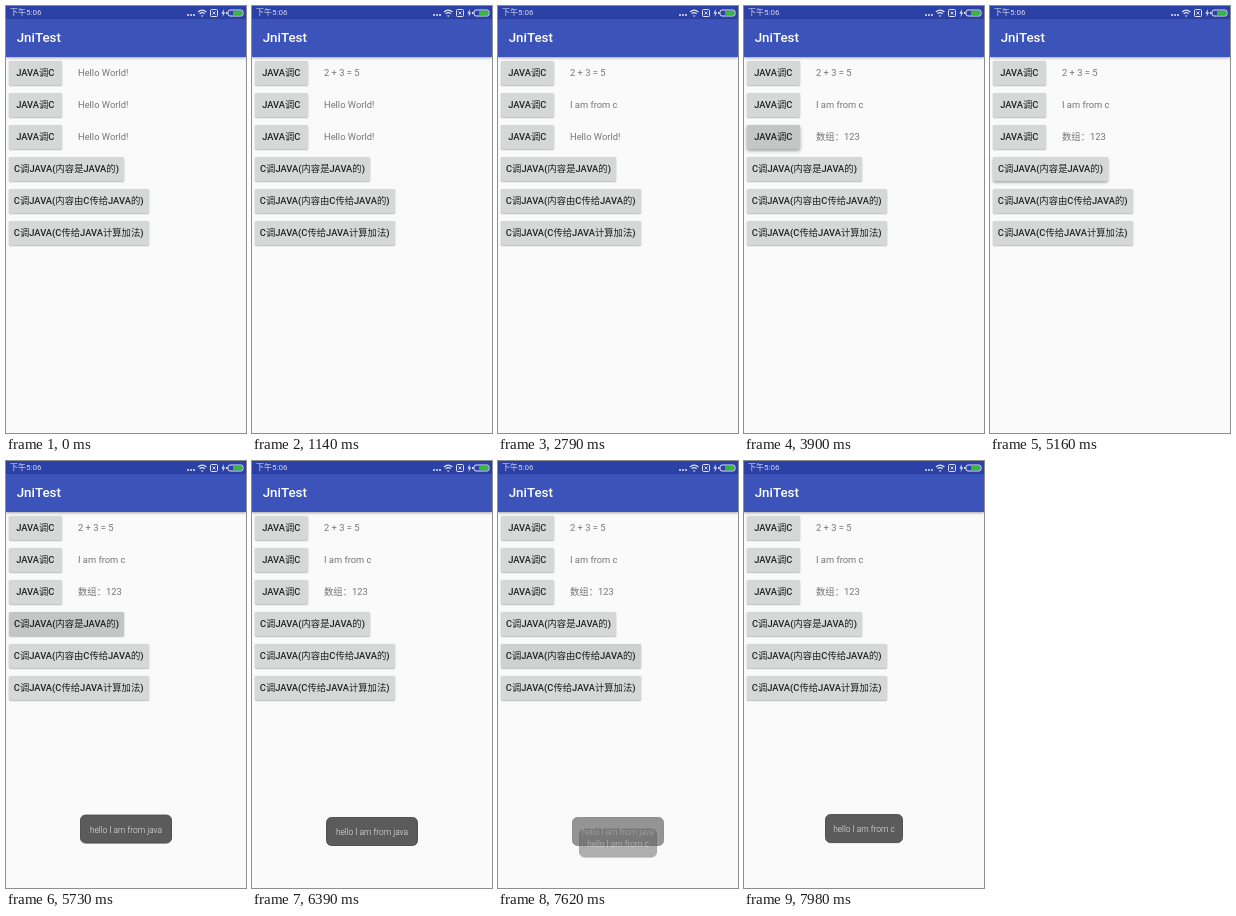
These frames come from a looping animation (240 by 427 pixels, 8 s). An HTML page:

```html
<!DOCTYPE html>
<html lang="zh-CN">
<head>
<meta charset="utf-8">
<title>JniTest</title>
<style>
html, body { margin: 0; width: 100%; height: 100%; overflow: hidden; background: #fafafa; }
body { position: relative; font: 9.33px/24px Roboto, "Noto Sans CJK SC", "Noto Sans CJK", sans-serif; }
div { position: absolute; white-space: nowrap; box-sizing: border-box; }
#status { left: 0; top: 0; width: 100%; height: 13.33px; background: #2c41a5; }
#status div { left: 4px; top: 0; color: #d5daf0; font-size: 8px; line-height: 14px; }
#status svg { position: absolute; left: 178px; top: 0; }
#bar { left: 0; top: 13.33px; width: 100%; height: 37.33px; background: #3c53b9; color: #fff;
  font-size: 13.33px; font-weight: 500; line-height: 38.5px; padding-left: 10.67px;
  box-shadow: 0 1px 2.5px rgba(0,0,0,.35); }
.button { left: 2.67px; height: 24px; border-radius: 1.4px; background: #d6d7d7;
  color: #202020; font-weight: 500; text-align: center; }
.ripple { inset: 0; border-radius: inherit; background: #000; opacity: 0; }
.value { left: 72px; color: #757575; }
.toast { height: 28.7px; top: 356px; border-radius: 5.5px; background: #5b5b5b; border: .6px solid #515151;
  color: #ececec; font-size: 8.4px; font-weight: 300; line-height: 28.4px; text-align: center; opacity: 0; }
</style>
</head>
<body>
<div id="status">
  <div>下午5:06</div>
  <svg width="62" height="13" fill="#dfe3f5">
    <circle cx="4" cy="9" r="1"/><circle cx="7" cy="9" r="1"/><circle cx="10" cy="9" r="1"/>
    <g fill="none" stroke="#dfe3f5">
      <path d="M14 6Q18.2 2.2 22.4 6M15.7 7.8Q18.2 5.6 20.7 7.8" stroke-width="1.2"/>
      <rect x="26.5" y="3.5" width="7" height="7" rx="1"/>
      <path d="M28.5 5.5l3 3m0-3l-3 3" stroke-width=".9"/>
      <rect x="44" y="4" width="15" height="6" rx="2"/>
    </g>
    <path d="M18.2 11l-1.4-1.6h2.8zM40 3l-2.6 4.5h1.7L38.4 11l2.8-4.6h-1.7z"/>
    <rect x="42" y="6" width="1.5" height="2"/>
    <rect x="49" y="4.8" width="9.2" height="4.4" rx="1" fill="#35b83c"/>
  </svg>
</div>
<div id="bar">JniTest</div>
<script>
const LOOP = 8000;
const CLICK_DELAY = 200;
const rows = [
  { label: 'JAVA调C', width: 53.33, press: 200, result: '2 + 3 = 5' },
  { label: 'JAVA调C', width: 53.33, press: 1900, result: 'I am from c' },
  { label: 'JAVA调C', width: 53.33, press: 3600, result: '数组：123' },
  { label: 'C调JAVA(内容是JAVA的)', width: 115.6, press: 5100 },
  { label: 'C调JAVA(内容由C传给JAVA的)', width: 140, press: 6850 },
  { label: 'C调JAVA(C传给JAVA计算加法)', width: 140 }
];
const toasts = [
  { text: 'hello I am from java', left: 74, width: 92, start: 5365, end: 7530 },
  { text: 'hello I am from c', left: 81, width: 78, start: 7532, end: LOOP }
];

const clamp = x => Math.min(1, Math.max(0, x));
const ramp = (t, from, to) => clamp((t - from) / (to - from));
const overshoot = t => 1 + (t - 1) ** 2 * (3 * (t - 1) + 2);

function add(parent, className, style, text = '') {
  const el = parent.appendChild(document.createElement('div'));
  el.className = className;
  el.textContent = text;
  Object.assign(el.style, style);
  return el;
}

rows.forEach((row, i) => {
  const top = 54.67 + 32 * i + 'px';
  row.button = add(document.body, 'button', { top, width: row.width + 'px' }, row.label);
  row.ripple = add(row.button, 'ripple', {});
  if (row.result) row.value = add(document.body, 'value', { top });
});
for (const toast of toasts) {
  toast.el = add(document.body, 'toast', { left: toast.left + 'px', width: toast.width + 'px' }, toast.text);
}

function drawRow({ press = Infinity, button, ripple, value, result }, t) {
  const age = t - press;
  const lift = ramp(age, 0, 100) - ramp(age, 300, 400);
  const spread = ramp(age, 60, 360);
  button.style.boxShadow = `0 ${.8 + lift}px ${1.6 + 2 * lift}px rgba(0,0,0,${.32 + .06 * lift})`;
  ripple.style.opacity = .085 * (ramp(age, 60, 200) - ramp(age, 630, 850));
  ripple.style.clipPath = `circle(${spread * 110}% at 50% 50%)`;
  if (value) value.textContent = age >= CLICK_DELAY ? result : 'Hello World!';
}

function drawToast({ el, start, end }, t) {
  const shown = t < start ? 0 : overshoot(ramp(t, start, start + 800));
  el.style.opacity = clamp(shown) * (1 - ramp(t, end, end + 250));
  el.style.transform = `translateY(${22 * (1 - shown)}px)`;
}

function draw() {
  const t = performance.now() % LOOP;
  rows.forEach(row => drawRow(row, t));
  toasts.forEach(toast => drawToast(toast, t));
  requestAnimationFrame(draw);
}
draw();
</script>
</body>
</html>
```
